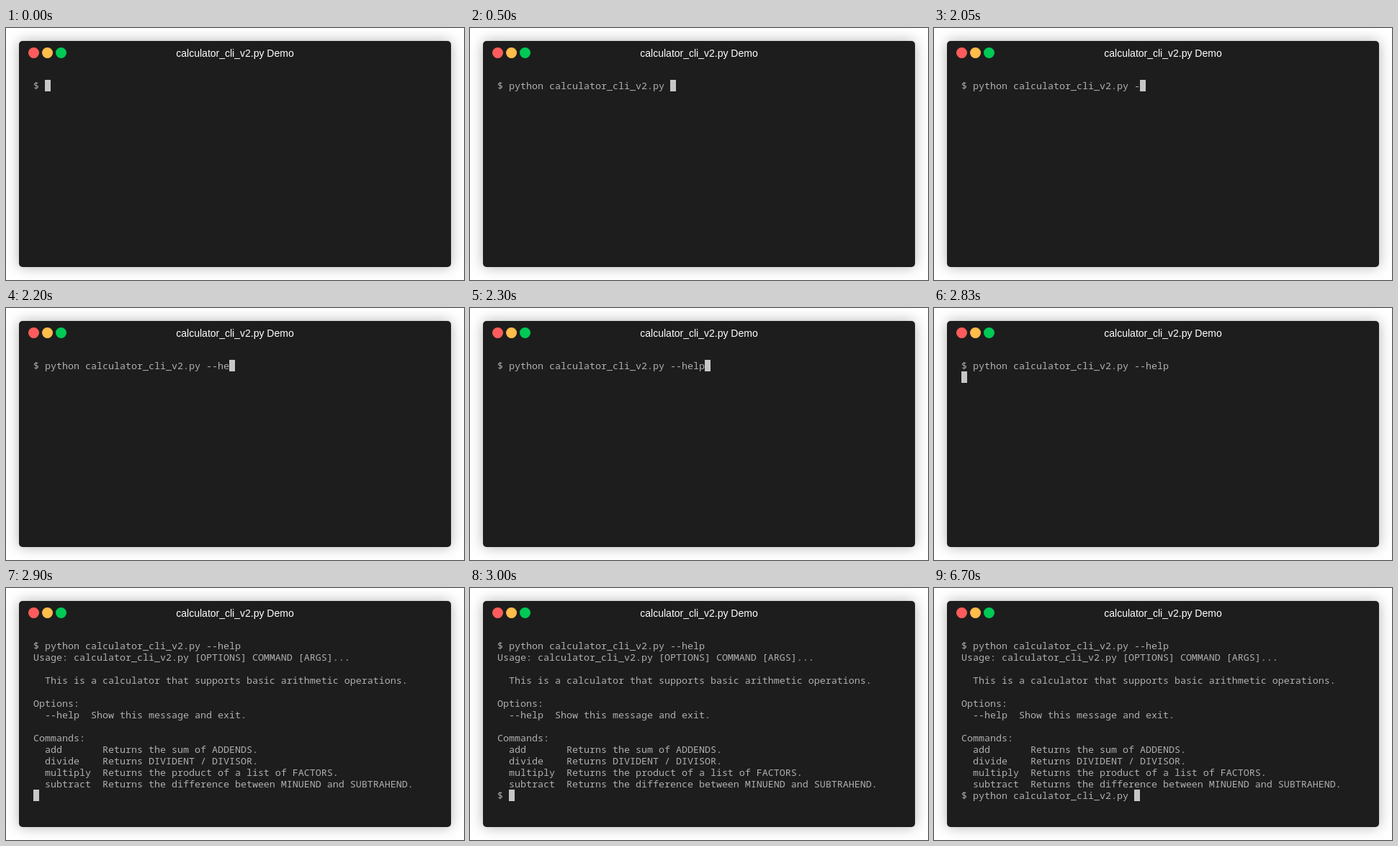
An HTML page that plays this animation: 636x350 px, repeating every 8 s.

```html
<!DOCTYPE html>
<html lang="en">
<head>
<meta charset="utf-8">
<title>Terminal demo</title>
<style>
  html, body { margin: 0; width: 100%; height: 100%; overflow: hidden; background: #fff; }
  svg { display: block; width: 636px; height: 350px; }
  .window { position: absolute; left: 18px; top: 18px; width: 600px; height: 314px;
    border-radius: 5px; background: #1d1d1d; box-shadow: 0 0 18px rgba(0, 0, 0, .3); }
  svg { position: absolute; left: 0; top: 0; }
  .title { font: 14px "Liberation Sans", Arial, sans-serif; fill: #fff; text-anchor: middle; }
  .line { font: 13.3333px "Noto Sans Mono", "DejaVu Sans Mono", monospace; fill: #afafaf; white-space: pre; }
</style>
</head>
<body>
<div class="window"></div>
<svg viewBox="0 0 636 350">
  <circle cx="38.5" cy="34.5" r="7.5" fill="#ff5c5c"/>
  <circle cx="57.5" cy="34.5" r="7.5" fill="#ffbd4c"/>
  <circle cx="76.5" cy="34.5" r="7.5" fill="#00ca56"/>
  <text class="title" x="318" y="40">calculator_cli_v2.py Demo</text>
  <g id="screen"></g>
  <rect id="cursor" width="8" height="16" fill="#c7c7c7"/>
</svg>
<script>
const DURATION = 8000, LEFT = 38, TOP = 72, CELL_W = 8, CELL_H = 16, ROWS = 14;
const PROMPT = "$ ";
const COMMAND = "python calculator_cli_v2.py ";
const FLAG = "--help";
const HELP = `Usage: calculator_cli_v2.py [OPTIONS] COMMAND [ARGS]...

  This is a calculator that supports basic arithmetic operations.

Options:
  --help  Show this message and exit.

Commands:
  add       Returns the sum of ADDENDS.
  divide    Returns DIVIDENT / DIVISOR.
  multiply  Returns the product of a list of FACTORS.
  subtract  Returns the difference between MINUEND and SUBTRAHEND.
`;

const screen = document.getElementById("screen");
const cursor = document.getElementById("cursor");
const rows = Array.from({ length: ROWS }, (_, i) => {
  const row = document.createElementNS("http://www.w3.org/2000/svg", "text");
  row.setAttribute("class", "line");
  row.setAttribute("x", LEFT);
  row.setAttribute("y", TOP + i * CELL_H + 13);
  return screen.appendChild(row);
});

// Everything the terminal has printed by time t (ms)
function output(t) {
  let text = PROMPT;
  if (t >= 500) text += COMMAND;
  if (t >= 2050) text += FLAG.slice(0, Math.floor((t - 2050) / 50) + 1);
  if (t >= 2830) text += "\n";
  if (t >= 2900) text += HELP;
  if (t >= 3000) text += PROMPT;
  if (t >= 6700) text += COMMAND;
  return text;
}

let shown = null;
function render(t) {
  const text = output(t);
  if (text === shown) return;
  shown = text;
  const lines = text.split("\n");
  rows.forEach((row, i) => { row.textContent = lines[i] || ""; });
  const last = lines.length - 1;
  cursor.setAttribute("x", LEFT + lines[last].length * CELL_W);
  cursor.setAttribute("y", TOP + last * CELL_H);
}

const start = performance.now();
function tick() {
  render((performance.now() - start) % DURATION);
  requestAnimationFrame(tick);
}
tick();
</script>
</body>
</html>
```
